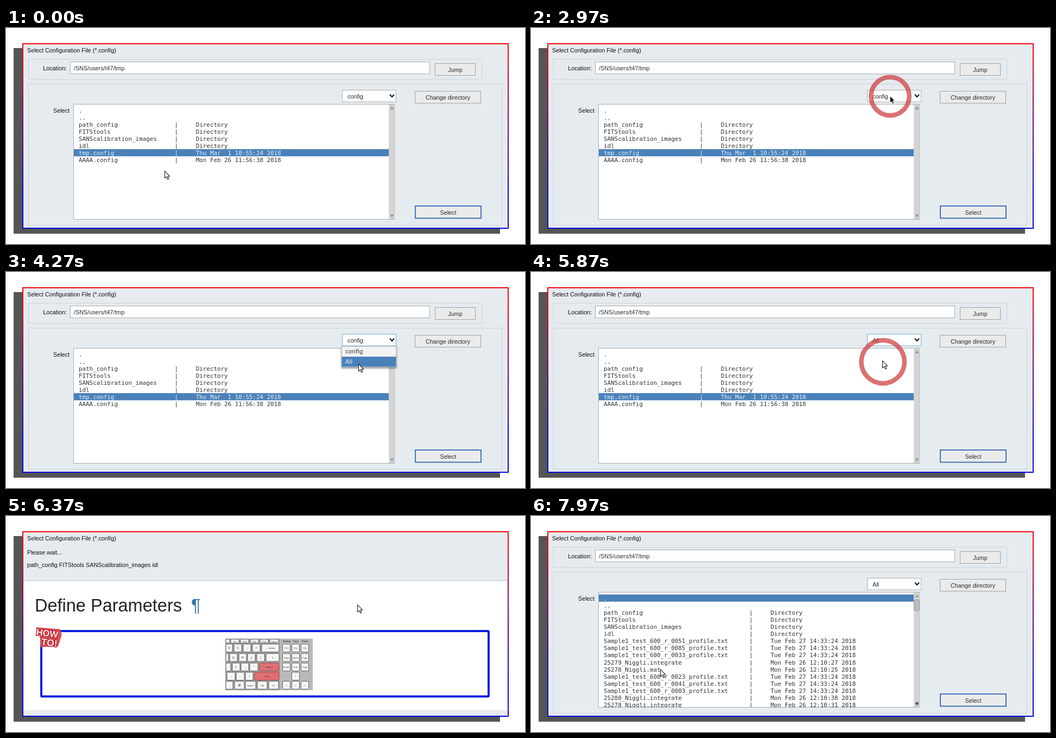
Write an HTML page that moves like this. It is 956 px wide and 398 px high and loops after 8000 ms.

```html
<!DOCTYPE html>
<html lang="en">
<head>
<meta charset="utf-8">
<title>File selection</title>
<style>
  html, body { margin: 0; width: 100%; height: 100%; overflow: hidden; background: #fff; }
  svg { display: block; width: 956px; height: 398px; }
  text { font-family: "Liberation Sans", Arial, sans-serif; font-size: 10.8px; fill: #111; white-space: pre; }
  .ui { fill: #2b2b2b; }
  .mono { font-family: "DejaVu Sans Mono", monospace; font-size: 10.87px; fill: #333; }
  .menu { font-family: "DejaVu Sans", sans-serif; font-size: 10.6px; fill: #333; }
  .tiny { font-size: 4.2px; fill: #333; }
</style>
</head>
<body>
<svg id="stage" viewBox="0 0 956 398"></svg>
<script>
const LOOP = 8000;
const BLUE = '#4a81b9';

const rect = (x, y, w, h, fill, stroke = 'none', extra = '') =>
  `<rect x="${x}" y="${y}" width="${w}" height="${h}" fill="${fill}" stroke="${stroke}" ${extra}/>`;
const text = (x, y, s, extra = '') => `<text x="${x}" y="${y}" ${extra}>${s}</text>`;
const group = (id, body, extra = '') => `<g id="${id}" ${extra}>${body}</g>`;
const button = (x, y, w, h, label, stroke = '#a0a2a4', width = 1) =>
  rect(x, y, w, h, '#ebebeb', stroke, `stroke-width="${width}"`) +
  text(x + w / 2, y + h / 2 + 4.9, label, 'class="ui" text-anchor="middle"');

// File lists
const folders = ['path_config', 'FITStools', 'SANScalibration_images', 'idl'].map(n => [n, 'Directory']);
const head = [['.'], ['..'], ...folders];
const profile = n => [`Sample1_test_600_r_${n}_profile.txt`, 'Tue Feb 27 14:33:24 2018'];
const scan = (name, time) => [name, `Mon Feb 26 12:10:${time} 2018`];
const shortList = [...head,
  ['tmp.config', 'Thu Mar  1 10:55:24 2018'],
  ['AAAA.config', 'Mon Feb 26 11:56:38 2018']];
const longList = [...head,
  ...['0051', '0085', '0033'].map(profile),
  scan('25279_Niggli.integrate', 27), scan('25278_Niggli.mat', 25),
  ...['0023', '0041', '0003'].map(profile),
  scan('25280_Niggli.integrate', 38), scan('25278_Niggli.integrate', 31)];

function fileRows(list, pad, gap, selected) {
  return list.map(([name, info], i) => {
    const top = 145 + 13.1 * i;
    const line = info ? name.padEnd(pad) + '|' + ' '.repeat(gap) + info : name;
    const on = i === selected;
    return (on ? rect(125, top - 0.4, 580, 13.2, BLUE) : '') +
      text(134, top + 10.6, line, `class="mono" ${on ? 'style="fill:#e8f0f7"' : ''}`);
  }).join('');
}

const arrow = (y, dir, id) =>
  `<path id="${id}" d="M707.5 ${y - 3 * dir}h7l-3.5 ${6 * dir}z" fill="#9a9a9a"/>`;

function dialog() {
  return rect(41.5, 57.5, 835, 37, 'none', '#cdd3d8') +
    rect(41.5, 103.5, 872, 260, 'none', '#cdd3d8') +
    text(112, 78, 'Location:', 'text-anchor="end"') +
    rect(118.5, 62.5, 662, 22, '#fff', '#a9adb0') +
    text(125, 78, '/SNS/users/t47/tmp', 'class="ui"') +
    button(790.5, 65.5, 74, 22, 'Jump') +
    button(753.5, 116.5, 121, 22, 'Change directory') +
    button(754, 328, 121, 22.5, 'Select', '#3767b5', 1.8) +
    text(117, 156, 'Select', 'text-anchor="end"') +
    rect(124.5, 140.5, 591, 212, '#fff', '#a9adb0') +
    `<g clip-path="url(#listClip)">` +
    group('short', fileRows(shortList, 27, 5, 6)) +
    group('long', fileRows(longList, 41, 5, 0)) + '</g>' +
    rect(705, 141, 10.5, 211, '#d4d4d4') +
    group('thumb', rect(705.5, 154.5, 10, 19.5, '#bdbdbd', '#929292', 'rx="2"')) +
    arrow(147, -1, 'up') + arrow(346.5, 1, 'down') +
    rect(619.5, 114.5, 99, 21.5, '#fff', '#a9adb0', 'id="field"') +
    text(629, 129.5, 'config', 'class="ui" id="choice"') +
    '<path d="M707 122.5l4 4.5l4-4.5" fill="none" stroke="#111" stroke-width="2"/>' +
    group('menu',
      rect(618, 137, 101, 38, '#f3f3f3', '#a5abb0', 'filter="url(#soft)"') +
      rect(618.5, 156, 100, 18.5, BLUE, 'none', 'id="hover"') +
      text(625, 150, 'config', 'class="menu" id="item0"') +
      text(625, 168.7, 'All', 'class="menu" id="item1"'));
}

// Keyboard picture: each row is [y, keys as x, width, label, red?]
function keyboard() {
  const rows = [
    [227, [[405, 7, ''], [414, 15, 'F9'], [432, 15, 'F10'], [450, 15, 'F11'], [468, 15, 'F12'], [486, 16, 'Eject']], 7],
    [236, [[405, 12, '9'], [420, 14, '0'], [437, 14, '-'], [454, 14, '='], [471, 32, '← Delete']]],
    [253.5, [[405, 5, ''], [412, 14, 'O'], [429, 14, 'P'], [445, 14, '['], [462, 14, ']'], [479, 24, '\\']]],
    [271, [[405, 9, ''], [417, 14, 'L'], [433, 14, ';'], [449, 15, '"'], [467, 36, 'Return', 1]]],
    [288, [[407, 15, ','], [424, 15, '.'], [441, 14, '/'], [458, 45, 'Shift', 1]]],
    [304.5, [[405, 13, ''], [421, 18, '⌘'], [441, 19, 'Option'], [463, 18, 'Ctrl'], [484, 18, 'Fn']]]];
  const pad = (y, labels, x0 = 509.5) => [y, labels.map((s, i) => [x0 + 17 * i, 14, s])];
  rows.push(pad(236, ['F13', 'F14', 'F15']), pad(253.5, ['Help', 'Home', 'Page']),
    pad(271, ['Delete', 'End', 'Page']), pad(288, ['↑'], 526.5), pad(304.5, ['←', '↓', '→']));
  const keys = rows.map(([y, list, h = 14.5]) => list.map(([x, w, s, red]) =>
    rect(x, y, w, h, red ? '#df6f72' : '#f5f5f3', red ? '#a84a4c' : '#666', 'stroke-width="1" rx="1.5"') +
    text(x + w / 2, y + h / 2 + 2, s, `class="tiny" text-anchor="middle" ${s.length === 1 ? 'style="font-size:6px"' : ''}`)
  ).join('')).join('');
  const lights = ['Analog', 'Caps', 'Power'].map((s, i) =>
    text(517 + 17 * i, 232, s, 'class="tiny" text-anchor="middle" font-weight="bold"')).join('');
  return `<g clip-path="url(#keyClip)">` + rect(404, 226, 161, 95, '#b9b9b9') +
    rect(404, 226, 100, 95, '#9b9b9b') + keys + lights + '</g>';
}

function badge() {
  const word = (x, y, s, size, extra) => text(x, y, s,
    `style="font-size:${size}px;font-weight:bold;fill:#f6eeee;stroke:#c4202c;stroke-width:3;paint-order:stroke" ${extra}`);
  return `<g transform="rotate(7 78 223)"><path d="M53 208l45-2l4 10l-4 22l-32 5l-3-17z" fill="#d5525b"/>` +
    word(55, 222, 'HOW', 16.5, 'textLength="42"').replace(' textLength="42"', '') +
    word(66, 239, 'TO!', 17.5, '') + '</g>';
}

function waitPage() {
  return text(39, 71, 'Please wait...') +
    text(39, 93.5, folders.map(f => f[0]).join(' '), 'id="progress"') +
    `<g clip-path="url(#pageClip)">` + group('notebook',
      rect(32, 119, 892, 239, '#fff') + rect(32, 118.5, 892, 1, '#b5b9bc') +
      text(53, 176, 'Define Parameters', 'style="font-size:32.5px;fill:#242424"') +
      text(341, 176, '¶', 'style="font-size:32.5px;fill:#3674b0"') +
      rect(65, 212, 824, 120.5, '#fff', '#0b1fe0', 'stroke-width="4" rx="1.5"') +
      keyboard() + badge()) + '</g>';
}

const clip = (id, ...box) => `<clipPath id="${id}">${rect(...box, '#000')}</clipPath>`;
const stage = document.getElementById('stage');
stage.innerHTML = '<defs>' +
  clip('listClip', 125, 141, 580, 211) + clip('keyClip', 404, 226, 161, 95) + clip('pageClip', 32, 30, 892, 338) +
  `<linearGradient id="edge" gradientUnits="userSpaceOnUse" x1="0" y1="28" x2="0" y2="370">
    <stop offset="0.05" stop-color="#f60a10"/><stop offset="0.8" stop-color="#0a0ae0"/></linearGradient>
  <filter id="soft" x="-10%" y="-20%" width="120%" height="150%">
    <feDropShadow dx="0" dy="2" stdDeviation="1.8" flood-opacity="0.45"/></filter></defs>` +
  rect(0, 0, 956, 398, '#fff') + rect(14, 37, 896, 342, '#555') +
  rect(31, 29, 894, 340, '#e6ebef') +
  text(39, 44.5, 'Select Configuration File (*.config)') +
  group('dialog', dialog()) + group('wait', waitPage()) +
  rect(31, 29, 894, 340, 'none', 'url(#edge)', 'stroke-width="2"') +
  '<circle id="ring" fill="none" stroke="#cc3c3c" stroke-opacity="0.72"/>' +
  '<path id="pointer" d="M0 0V14L3.2 11.1L5.4 16.2L7.7 15.2L5.5 10.3H9.6Z" stroke-linejoin="round"/>';

const $ = id => document.getElementById(id);
const show = (id, on) => $(id).setAttribute('display', on ? 'inline' : 'none');
const set = (id, name, value) => $(id).setAttribute(name, value);

// Pointer path: time, x, y
const path = [
  [0, 292, 263], [70, 252, 283], [170, 166, 330], [470, 46, 256],
  [770, 305, 204], [1070, 507, 162], [1170, 547, 146], [1270, 578, 130],
  [1670, 628, 127], [2070, 661, 125], [3570, 661, 125], [3870, 657, 145],
  [4270, 649, 169], [4670, 649, 169], [4870, 648, 166], [4970, 648, 166],
  [5070, 647, 163], [6670, 647, 163], [6870, 625, 178], [7070, 556, 226],
  [7270, 452, 288], [7470, 372, 322], [7670, 304, 314], [7970, 238, 282]];

function pointerAt(t) {
  const i = path.findIndex(p => p[0] >= t);
  if (i < 1) return path[i < 0 ? path.length - 1 : 0].slice(1);
  const [a, b] = [path[i - 1], path[i]];
  const k = (t - a[0]) / (b[0] - a[0]);
  return [1, 2].map(n => a[n] + (b[n] - a[n]) * k);
}

// Click ring: start, end, centre, first radius, growth per ms
const clicks = [[2370, 3570, 661.5, 125.8, 8, 0.0525], [5270, 6370, 648.2, 165.5, 7.5, 0.0608]];

function drawRing(t) {
  const c = clicks.find(c => t >= c[0] && t < c[1]);
  show('ring', c);
  if (!c) return;
  const age = t - c[0] < 200 ? 0 : t - c[0];
  const outer = c[4] + age * c[5];
  const width = Math.min(8.5, outer);
  set('ring', 'cx', c[2]);
  set('ring', 'cy', c[3]);
  set('ring', 'r', outer - width / 2);
  set('ring', 'stroke-width', width);
}

function draw(time) {
  const t = time < 70 ? 0 : 70 + 100 * Math.floor((time - 70) / 100);
  const waiting = t >= 6170 && t < 6670;
  const loaded = t >= 6670;
  const open = t >= 3270 && t < 5570;
  const chosen = t >= 5570;
  const [x, y] = pointerAt(t);

  show('dialog', !waiting);
  show('wait', waiting);
  show('progress', t >= 6370);
  set('notebook', 'transform', `translate(0 ${t < 6370 ? -23 : 0})`);

  show('short', !loaded);
  show('long', loaded);
  show('thumb', loaded);
  set('down', 'fill', loaded ? '#444' : '#9a9a9a');
  $('choice').textContent = chosen ? 'All' : 'config';
  set('field', 'stroke', t >= 3270 && !loaded ? '#75acd8' : '#a9adb0');

  show('menu', open);
  const all = y > 154;
  set('hover', 'y', all ? 156 : 137.5);
  $('item0').style.fill = all ? '#333' : '#eef4f9';
  $('item1').style.fill = all ? '#eef4f9' : '#333';

  drawRing(t);
  const dark = t >= 470 && t < 3570;
  show('pointer', t < 270 || t >= 470);
  set('pointer', 'transform', `translate(${x + 0.5} ${y + 0.5}) scale(${dark ? 0.86 : 0.95})`);
  set('pointer', 'fill', dark ? '#080808' : '#fff');
  set('pointer', 'stroke', dark ? '#fff' : '#111');
  set('pointer', 'stroke-width', dark ? 0.6 : 1.1);
}

function tick(now) {
  draw(now % LOOP);
  requestAnimationFrame(tick);
}
draw(0);
requestAnimationFrame(tick);
</script>
</body>
</html>
```
